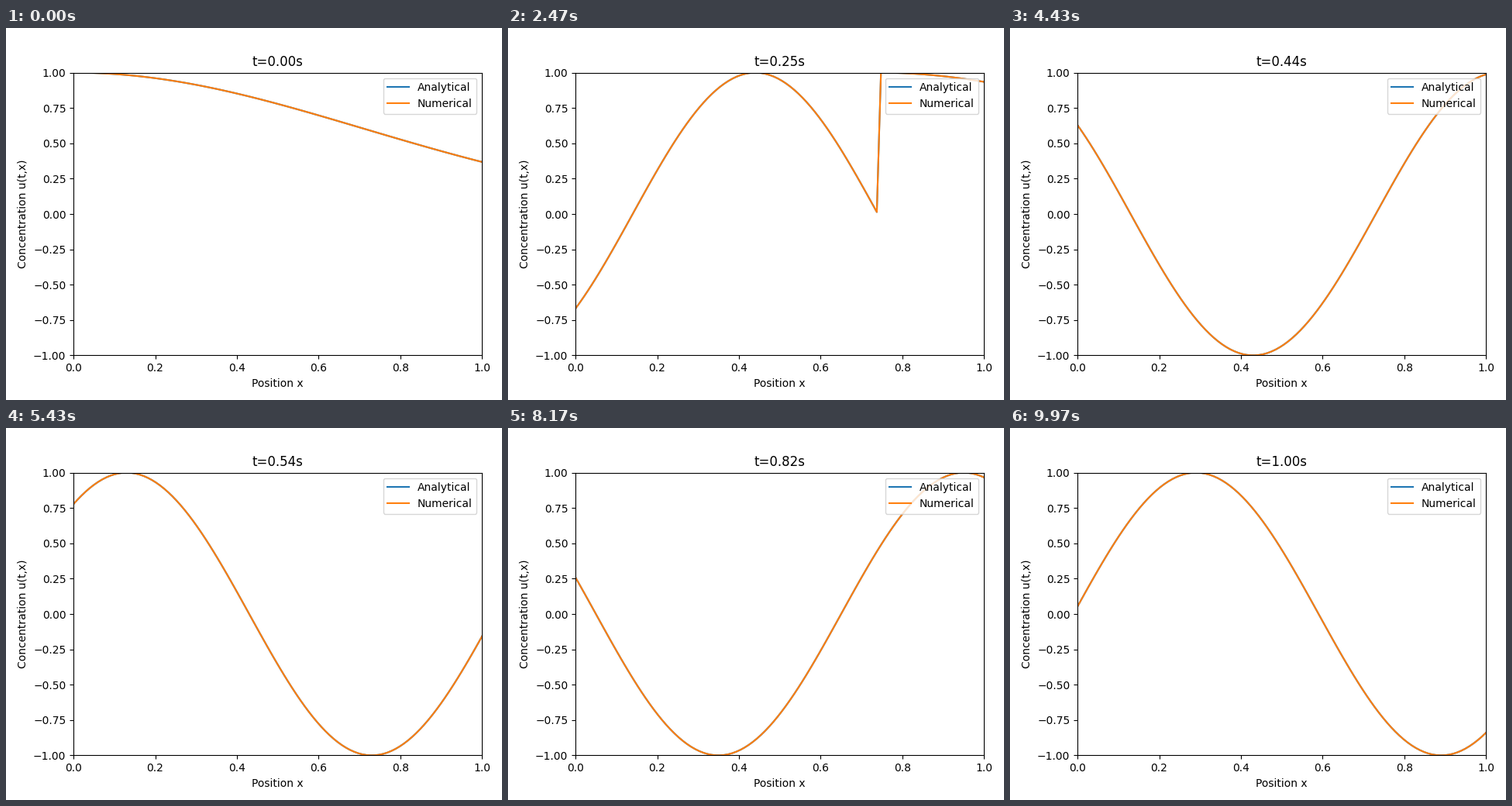
A matplotlib script for the animation above (10 s loop, 640 by 480 pixels).

```python
import numpy as np
import matplotlib.pyplot as plt
from matplotlib.animation import FuncAnimation

TICK_MS = 20
TICKS = 500
STEPS = 300  # solution steps per loop
SPEED = 3.0

x = np.linspace(0, 1, 100)


def concentration(t):
    """Advected bell curve, followed by the sine wave fed in at x = 0."""
    shift = x - SPEED * t
    inflow = np.sin(5 * np.pi * (t - x / SPEED))
    return np.where(shift >= 0, np.exp(-shift**2), inflow)


fig, ax = plt.subplots(figsize=(6.4, 4.8), dpi=100)
fig.subplots_adjust(left=0.136, right=0.96, bottom=0.12, top=0.88)
ax.set(xlim=(0, 1), ylim=(-1, 1),
       xlabel="Position x", ylabel="Concentration u(t,x)")
lines = [ax.plot(x, concentration(0), label=name)[0]
         for name in ("Analytical", "Numerical")]
title = ax.set_title("t=0.00s")
ax.legend(loc="upper right")


def update(tick):
    step = int(tick * STEPS / TICKS + 0.5)  # nearest solution step
    t = step / STEPS
    u = concentration(t)
    for line in lines:
        line.set_ydata(u)
    title.set_text(f"t={t:.2f}s")
    return [*lines, title]


anim = FuncAnimation(fig, update, frames=TICKS, interval=TICK_MS,
                     repeat=True, repeat_delay=0, blit=False)
plt.show()
```
